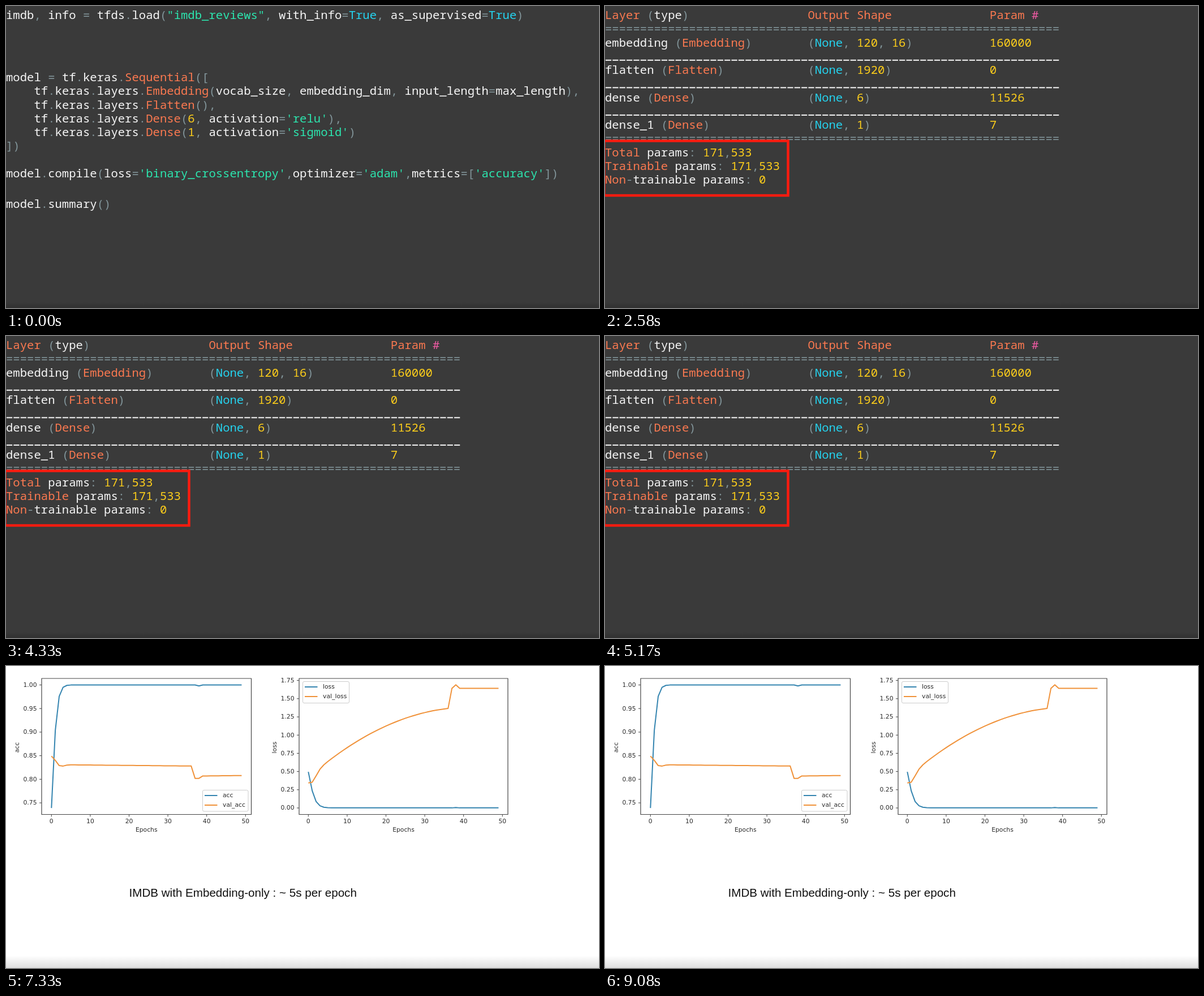
An HTML page with a canvas for the animation above (9.33 s loop, 1048 px wide and 534 px high).

```html
<!DOCTYPE html>
<html lang="en">
<head>
<meta charset="utf-8">
<title>Embedding model walkthrough</title>
<style>
  html, body { margin: 0; width: 100%; height: 100%; overflow: hidden; background: #3a3a3a; }
  canvas { display: block; }
</style>
</head>
<body>
<canvas id="stage" width="1048" height="534"></canvas>
<script>
const ctx = document.getElementById('stage').getContext('2d');
const W = 1048, H = 534, LOOP = 9330;
const COL = 12.36, ROW = 24.27;
const MONO = '500 20.6px "Roboto Mono", "Noto Sans Mono", monospace';
const LABEL = '10.8px "DejaVu Sans", sans-serif';
const BLUE = '#3585b0', ORANGE = '#f0923a', EDGE = '#444', TEXT = '#2a2a2a';

const INK = {
  plain: '#f6f6f6', mark: '#82959a', name: '#fb7950', text: '#2ce5ae',
  word: '#25d3ef', number: '#fccd1b', hash: '#f45ba6'
};

const LOAD = 'imdb, info = tfds.load("imdb_reviews", with_info=True, as_supervised=True)';
const MODEL = `model = tf.keras.Sequential([
    tf.keras.layers.Embedding(vocab_size, embedding_dim, input_length=max_length),
    tf.keras.layers.Flatten(),
    tf.keras.layers.Dense(6, activation='relu'),
    tf.keras.layers.Dense(1, activation='sigmoid')
])

model.compile(loss='binary_crossentropy',optimizer='adam',metrics=['accuracy'])`;
const SUMMARY = 'model.summary()';

const tableRow = (a, b, c) => a.padEnd(29) + b.padEnd(26) + c;
const DOUBLE = '='.repeat(65), SINGLE = '_'.repeat(65);
const TABLE = [
  tableRow('Layer (type)', 'Output Shape', 'Param #'),
  DOUBLE,
  tableRow('embedding (Embedding)', '(None, 120, 16)', '160000'),
  SINGLE,
  tableRow('flatten (Flatten)', '(None, 1920)', '0'),
  SINGLE,
  tableRow('dense (Dense)', '(None, 6)', '11526'),
  SINGLE,
  tableRow('dense_1 (Dense)', '(None, 1)', '7'),
  DOUBLE,
  'Total params: 171,533',
  'Trainable params: 171,533',
  'Non-trainable params: 0'
].join('\n');

// Training curves by epoch, with a disturbance around epoch 38
const EPOCHS = 50, JUMP = 37;
const bump = e => Math.max(0, 1 - Math.abs(e - 38));
const acc = e => 1 - 0.261 * Math.exp(-(e ** 1.25)) - 0.002 * bump(e);
const loss = e => 0.495 * Math.exp(-0.745 * e ** 1.22) + 0.001 + 0.005 * bump(e);

function valAcc(e) {
  if (e >= JUMP) return e < JUMP + 2 ? 0.802 : 0.807 + 0.0001 * (e - JUMP - 2);
  return 0.831 - 0.00008 * e + 0.018 * Math.exp(-0.2 * e * e) * Math.cos(0.9 * e);
}

function valLoss(e) {
  if (e >= JUMP) return 1.643 + 0.047 * bump(e);
  return 0.418 + 0.0466 * e - 0.000563 * e * e - 0.075 * (1 + e) * Math.exp(-0.3 * e * e);
}

const CHARTS = [
  {
    left: 63, width: 370.5, x0: 80.3, y0: 242, unit: 834,
    min: 0.75, max: 1, step: 0.05, label: 'acc', labelX: 20,
    legend: { x: 347.5, y: 219.5, w: 80.5, h: 37.5 },
    lines: [['acc', BLUE, acc], ['val_acc', ORANGE, valAcc]]
  },
  {
    left: 518, width: 369, x0: 534.3, y0: 251, unit: 128.8,
    min: 0, max: 1.75, step: 0.25, label: 'loss', labelX: 475,
    legend: { x: 524.5, y: 27.5, w: 82, h: 38 },
    lines: [['loss', BLUE, loss], ['val_loss', ORANGE, valLoss]]
  }
];

function inkFor(token) {
  if (/^['"]/.test(token)) return INK.text;
  if (/^(True|None)$/.test(token)) return INK.word;
  if (/^\d/.test(token)) return INK.number;
  if (/^[A-Z]/.test(token)) return INK.name;
  if (token === '#') return INK.hash;
  return /^\w/.test(token) ? INK.plain : INK.mark;
}

function drawDashes(y) {
  ctx.fillStyle = INK.plain;
  for (let i = 0; i < 65; i++) ctx.fillRect(i * COL + 1, y, 10.2, 2);
}

function drawBlock(block, top) {
  ctx.font = MONO;
  ctx.textAlign = 'left';
  ctx.textBaseline = 'alphabetic';
  block.split('\n').forEach((line, row) => {
    const y = top + row * ROW;
    if (line === SINGLE) return drawDashes(y - 1);
    for (const m of line.matchAll(/'[^']*'|"[^"]*"|\w+|[^\w\s'"]+/g)) {
      ctx.fillStyle = inkFor(m[0]);
      ctx.fillText(m[0], m.index * COL, y);
    }
  });
}

function fillStage(color, top, shade) {
  ctx.fillStyle = color;
  ctx.fillRect(0, 0, W, H);
  const fade = ctx.createLinearGradient(0, top, 0, H);
  fade.addColorStop(0, color);
  fade.addColorStop(1, shade);
  ctx.fillStyle = fade;
  ctx.fillRect(0, top, W, H - top);
}

function drawCode() {
  fillStage('#3a3a3a', 524, '#303030');
  drawBlock(LOAD, 23);
  drawBlock(MODEL, 133);
  drawBlock(SUMMARY, 357);
}

function drawTable() {
  fillStage('#3a3a3a', 524, '#303030');
  drawBlock(TABLE, 23);
  ctx.strokeStyle = '#fb1b0f';
  ctx.lineWidth = 4.5;
  ctx.strokeRect(-1.5, 238.5, 325, 96.5);
}

function drawLabel(text, x, y, align = 'center') {
  ctx.textAlign = align;
  ctx.fillText(text, x, y);
}

function stroke(points, color, width) {
  ctx.strokeStyle = color;
  ctx.lineWidth = width;
  ctx.beginPath();
  points.forEach(([x, y]) => ctx.lineTo(x, y));
  ctx.stroke();
}

function drawLegend({ x, y, w, h }, lines) {
  ctx.beginPath();
  ctx.roundRect(x, y, w, h, 2.5);
  ctx.fillStyle = '#fff';
  ctx.fill();
  ctx.strokeStyle = '#ccc';
  ctx.lineWidth = 1;
  ctx.stroke();
  ctx.fillStyle = TEXT;
  lines.forEach(([name, color], i) => {
    const lineY = y + 9.5 + i * 17;
    stroke([[x + 3.5, lineY], [x + 26, lineY]], color, 2);
    drawLabel(name, x + 35.5, lineY + 0.5, 'left');
  });
}

function drawChart(c) {
  const px = v => c.x0 + v * 6.86;
  const py = v => c.y0 - (v - c.min) * c.unit;
  const top = 22, bottom = 262.5;
  ctx.font = LABEL;
  ctx.textBaseline = 'middle';
  ctx.lineJoin = 'round';

  for (const [, color, curve] of c.lines) {
    stroke(Array.from({ length: EPOCHS }, (_, e) => [px(e), py(curve(e))]), color, 2);
  }

  ctx.fillStyle = TEXT;
  for (let v = 0; v <= EPOCHS; v += 10) {
    stroke([[px(v), bottom], [px(v), bottom + 4]], EDGE, 1);
    drawLabel(v, px(v), 275);
  }
  for (let v = c.min; v < c.max + c.step / 2; v += c.step) {
    stroke([[c.left - 4, py(v)], [c.left, py(v)]], EDGE, 1);
    drawLabel(v.toFixed(2), c.left - 8.5, py(v) + 0.5, 'right');
  }
  ctx.strokeStyle = EDGE;
  ctx.lineWidth = 1.2;
  ctx.strokeRect(c.left, top, c.width, bottom - top);

  drawLabel('Epochs', c.left + c.width / 2, 290.5);
  ctx.save();
  ctx.translate(c.labelX, 144);
  ctx.rotate(-Math.PI / 2);
  drawLabel(c.label, 0, 0);
  ctx.restore();
  drawLegend(c.legend, c.lines);
}

function drawCharts() {
  fillStage('#ffffff', 512, '#dedede');
  CHARTS.forEach(drawChart);
  ctx.font = '20.6px "Liberation Sans", Arial, sans-serif';
  ctx.textBaseline = 'alphabetic';
  ctx.fillStyle = '#111';
  drawLabel('IMDB with Embedding-only : ~ 5s per epoch', 217.5, 408, 'left');
}

function render() {
  const t = performance.now() % LOOP;
  if (t < 2580) drawCode();
  else if (t < 7330) drawTable();
  else drawCharts();
  requestAnimationFrame(render);
}
render();
</script>
</body>
</html>
```
